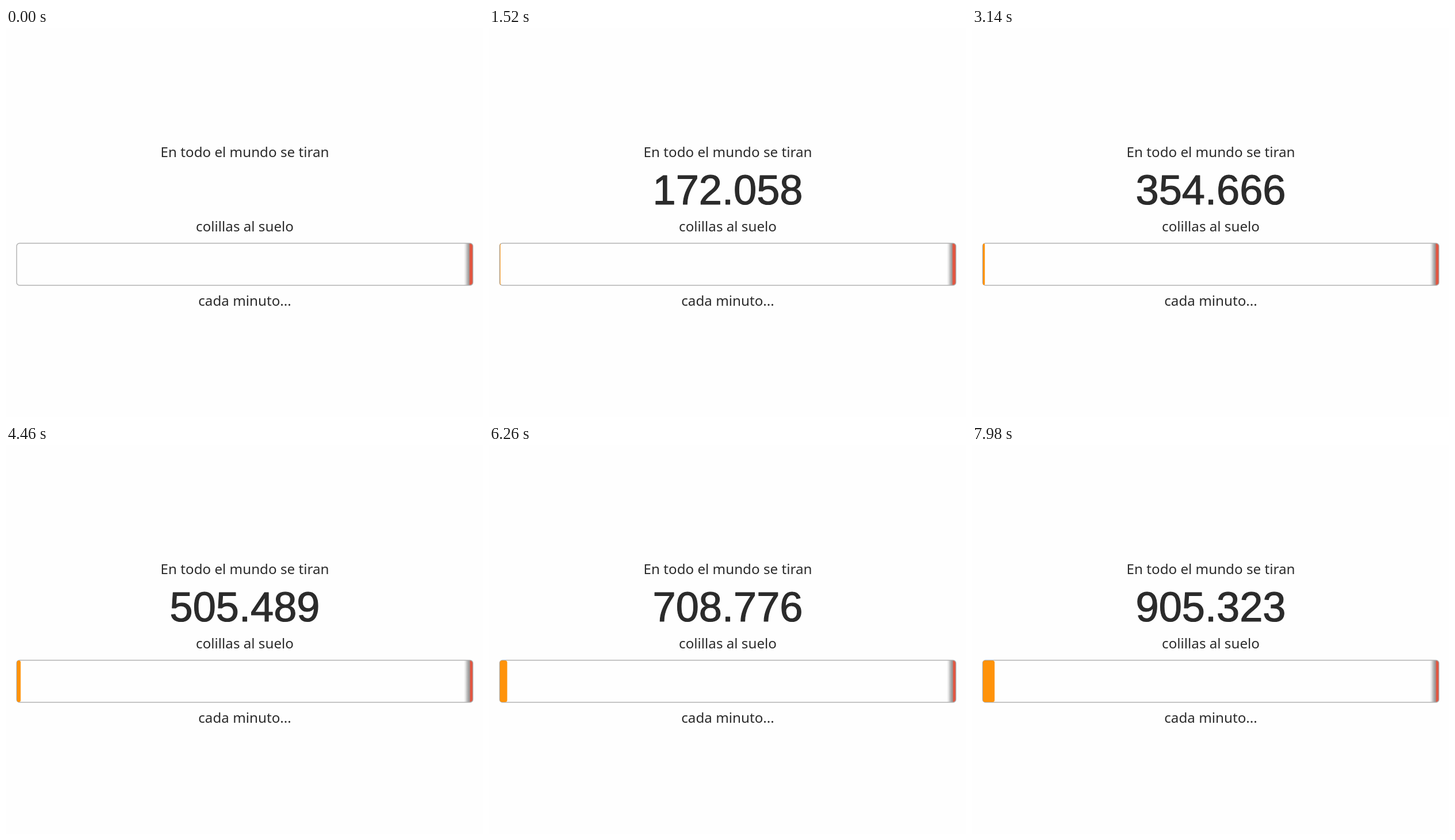
Animation, 829 px wide and 675 px high, one loop 8 s. Source, as an HTML page with a canvas:

```html
<!DOCTYPE html>
<html lang="es">
<head>
<meta charset="utf-8">
<title>Colillas por minuto</title>
<style>
  html, body { margin: 0; width: 100%; height: 100%; overflow: hidden; background: #fefefe; }
  canvas { display: block; width: 829px; height: 675px; }
</style>
</head>
<body>
<canvas id="stage" width="829" height="675"></canvas>
<script>
const ctx = document.getElementById('stage').getContext('2d');
const LOOP = 8000, TICK = 20;
const CENTER = 415;
const BOX = { x: 18.5, y: 373.5, w: 793, h: 73, r: 5 };
const INK = '#2b2b2b';
const HEADLINE = 'En todo el mundo se tiran';

// Counter pace: [ms, value]
const COUNT = [[0, 0], [1520, 172058], [3140, 354666], [4460, 505489],
               [5600, 633378], [6920, 784174], [7980, 905323]];

function countAt(t) {
  let i = 1;
  while (i < COUNT.length - 1 && t > COUNT[i][0]) i++;
  const [t0, v0] = COUNT[i - 1], [t1, v1] = COUNT[i];
  return Math.round(v0 + (v1 - v0) * (t - t0) / (t1 - t0));
}

const withDots = n => String(n).replace(/\B(?=(\d{3})+$)/g, '.');
const bodyFont = size => `500 semi-condensed ${size}px "Noto Sans", "Open Sans", sans-serif`;
const NUMBER_FONT = '72.2px "Liberation Sans", Arial, sans-serif';

// Font size at which the headline takes up the given width
function sizeFor(width) {
  ctx.font = bodyFont(100);
  return 100 * width / ctx.measureText(HEADLINE).width;
}
const BODY = bodyFont(sizeFor(293));

function label(text, y, font, weight = 0) {
  ctx.font = font;
  ctx.fillStyle = ctx.strokeStyle = INK;
  ctx.textAlign = 'center';
  ctx.textBaseline = 'alphabetic';
  ctx.fillText(text, CENTER, y);
  if (weight) {
    ctx.lineWidth = weight;
    ctx.lineJoin = 'round';
    ctx.strokeText(text, CENTER, y);
  }
}

function roundBox(x, y, w, h, r) {
  ctx.beginPath();
  ctx.roundRect(x, y, w, h, r);
}

function drawEmber(t) {
  const left = t < 2000 ? 805.6 : t < 3700 ? 806.1 : 806.5;
  const shade = ctx.createLinearGradient(795.5, 0, 806.5, 0);
  [[0, 0], [0.25, 0.08], [0.5, 0.23], [0.75, 0.36], [1, 0.42]].forEach(([p, a]) =>
    shade.addColorStop(p, `rgba(0,0,0,${a})`));
  ctx.fillStyle = shade;
  ctx.fillRect(795, 373, 12, 74);

  const glow = ctx.createLinearGradient(left - 1.2, 0, left + 1, 0);
  glow.addColorStop(0, 'rgba(226,85,64,0)');
  glow.addColorStop(1, 'rgb(226,85,64)');
  ctx.fillStyle = glow;
  ctx.fillRect(left - 2, 373, 814 - left, 74);
}

function drawBar(t) {
  const { x, y, w, h, r } = BOX;
  ctx.save();
  roundBox(x, y, w, h, r);
  ctx.clip();
  drawEmber(t);
  ctx.restore();

  ctx.strokeStyle = '#b0b0b0';
  ctx.lineWidth = 1.4;
  roundBox(x, y, w, h, r);
  ctx.stroke();

  // Slow start, then faster growth
  const fill = 20.3 * Math.pow(t / 7980, 1.95);
  if (fill > 0.05) {
    ctx.fillStyle = '#ff930a';
    roundBox(19, 374, fill, 72, Math.min(3.5, fill / 2));
    ctx.fill();
  }
}

function draw(t) {
  ctx.fillStyle = '#fefefe';
  ctx.fillRect(0, 0, 829, 675);
  label(HEADLINE, 223.5, BODY);
  label('colillas al suelo', 352.5, BODY);
  label('cada minuto...', 482, BODY);
  if (t > 0) label(withDots(countAt(t)), 306, NUMBER_FONT, 1.2);
  drawBar(t);
}

const start = performance.now();
function frame() {
  const t = (performance.now() - start) % LOOP;
  draw(Math.floor(t / TICK) * TICK);
  requestAnimationFrame(frame);
}
frame();
</script>
</body>
</html>
```
